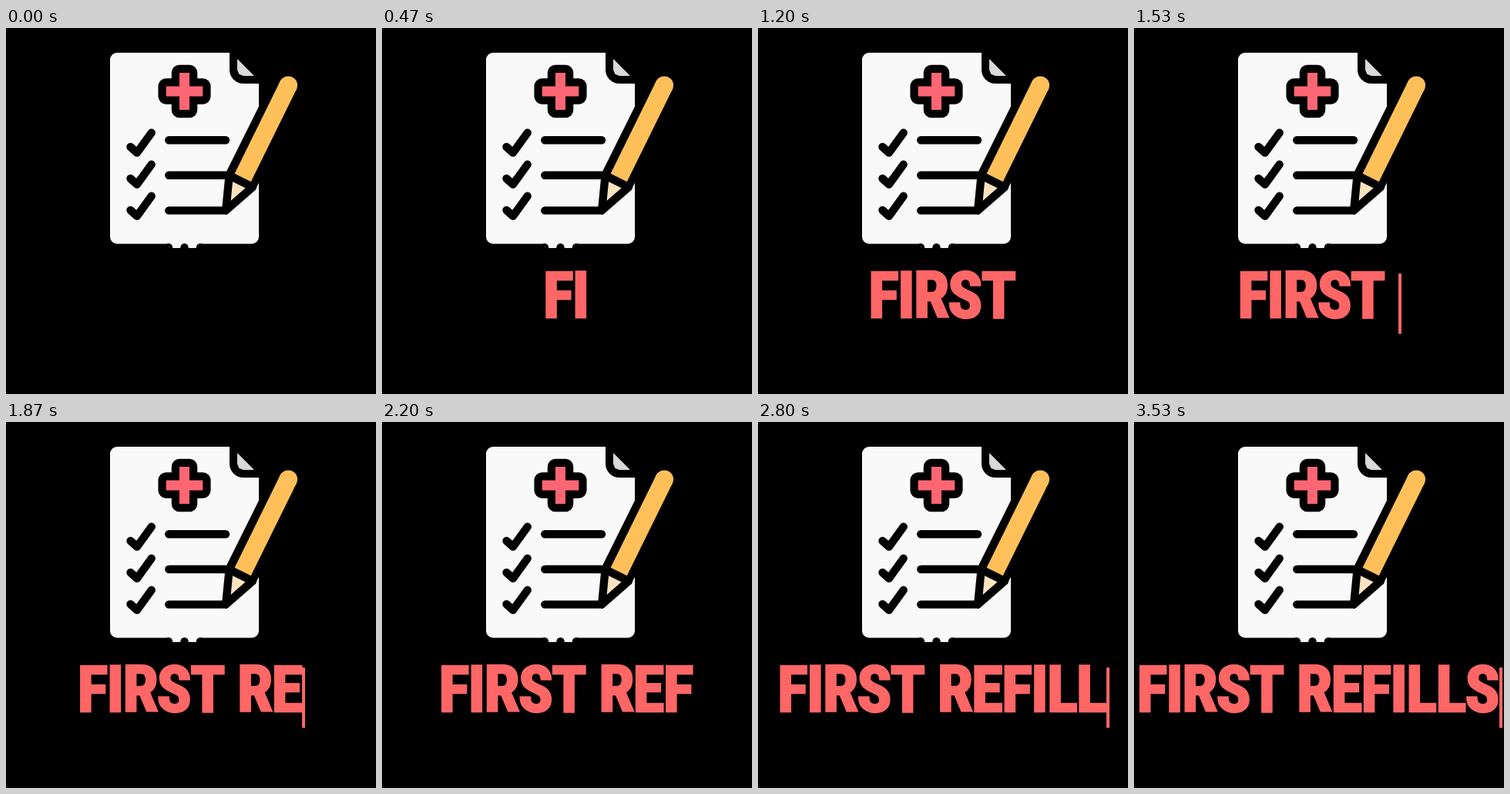
Recreate the animation shown at these times as an HTML page with a canvas. Size 480 px wide and 474 px high, loop 3990 ms.

```html
<!DOCTYPE html>
<html lang="en">
<head>
<meta charset="utf-8">
<title>Checklist</title>
<style>
  html, body { margin: 0; width: 100%; height: 100%; overflow: hidden; background: #000; }
  canvas { display: block; width: 100vw; height: 100vh; }
</style>
</head>
<body>
<canvas id="stage" width="480" height="474"></canvas>
<script>
const ctx = document.getElementById('stage').getContext('2d');

const LOOP = 3990, TICK = 66.5, TYPE_STEP = 232, BLINK = 500;
const TITLE = 'FIRST REFILLS', TITLE_WIDTH = 470, TITLE_SIZE = 86;
const INK = '#000', PAPER = '#f9f9f9', CORAL = '#ff6666', YELLOW = '#ffc05a';
const OUTLINE = 10.4;

const titleFont = size =>
  `900 condensed ${size}px "Roboto Condensed", "Open Sans", "Noto Sans", sans-serif`;

function line(points, color = INK, width = OUTLINE, cap = 'round') {
  ctx.beginPath();
  points.forEach(([x, y]) => ctx.lineTo(x, y));
  ctx.strokeStyle = color;
  ctx.lineWidth = width;
  ctx.lineCap = cap;
  ctx.lineJoin = 'round';
  ctx.stroke();
}

function polygon(points, color) {
  ctx.beginPath();
  points.forEach(([x, y]) => ctx.lineTo(x, y));
  ctx.closePath();
  ctx.fillStyle = color;
  ctx.fill();
}

function rect(x, y, w, h, color, radius = 0) {
  ctx.beginPath();
  ctx.roundRect(x, y, w, h, radius);
  ctx.fillStyle = color;
  ctx.fill();
}

function dot(x, y, r, color) {
  ctx.beginPath();
  ctx.arc(x, y, r, 0, Math.PI * 2);
  ctx.fillStyle = color;
  ctx.fill();
}

function drawPage() {
  rect(135, 32, 193, 247.5, PAPER, 9);
  rect(211, 276, 41, 9, PAPER);
  for (const x of [211, 231.5, 252]) dot(x, 284.3, 5.2, INK);

  // Folded corner
  rect(290, 20, 50, 52, INK, [0, 0, 0, 18]);
  polygon([[300, 40], [300, 54], [302.3, 59.7], [308, 62], [322, 62]], '#d9d9db');
}

function drawCross() {
  const bars = [[225, 58, 13, 48], [207.7, 75.5, 47.6, 13]];
  ctx.strokeStyle = INK;
  ctx.lineWidth = 20.5;
  ctx.lineJoin = 'round';
  bars.forEach(bar => ctx.strokeRect(...bar));
  bars.forEach(bar => rect(...bar, '#ff6673'));
}

function drawChecklist() {
  for (let row = 0; row < 3; row++) {
    const dy = row * 41, y = 145.2 + row * 45.6;
    line([[161.5, 154 + dy], [170, 161.5 + dy], [188.7, 135.7 + dy]]);
    line([[211.3, y], [285, y]]);
  }
}

function drawPencil() {
  const top = [366.2, 74.2];
  line([[305.3, 196.6], top], INK, 44, 'butt');
  line([[306.5, 195.2], top], YELLOW, 23.6, 'butt');
  dot(...top, 11.8, YELLOW);

  const tip = [[289.6, 191], [320, 206], [285.2, 236.2], [289.6, 191]];
  polygon(tip, '#ffe2c0');
  line(tip);
}

function drawTitle(time) {
  ctx.letterSpacing = '-2px';
  ctx.font = titleFont(TITLE_SIZE);
  const fit = Math.min(1, TITLE_WIDTH / ctx.measureText(TITLE).width);
  ctx.font = titleFont(TITLE_SIZE * fit);

  const text = TITLE.slice(0, Math.floor(time / TYPE_STEP));
  const width = ctx.measureText(text).width;
  const left = 240.5 - (width + 5) / 2;
  const baseline = 344.5 + ctx.measureText('E').actualBoundingBoxAscent / 2;

  ctx.fillStyle = ctx.strokeStyle = CORAL;
  ctx.lineWidth = 2.5;
  ctx.lineJoin = 'miter';
  ctx.miterLimit = 2;
  ctx.fillText(text, left, baseline);
  ctx.strokeText(text, left, baseline);

  if (Math.floor(time / BLINK) % 2) {
    rect(Math.round(left + width + 1), 318, 4, 78, CORAL);
  }
}

function render(now) {
  const time = Math.floor((now % LOOP) / TICK) * TICK;
  rect(0, 0, 480, 474, INK);
  drawPage();
  drawCross();
  drawChecklist();
  drawPencil();
  drawTitle(time);
}

let start;
function frame(now) {
  start ??= now;
  render(now - start);
  requestAnimationFrame(frame);
}
render(0);
requestAnimationFrame(frame);
</script>
</body>
</html>
```
